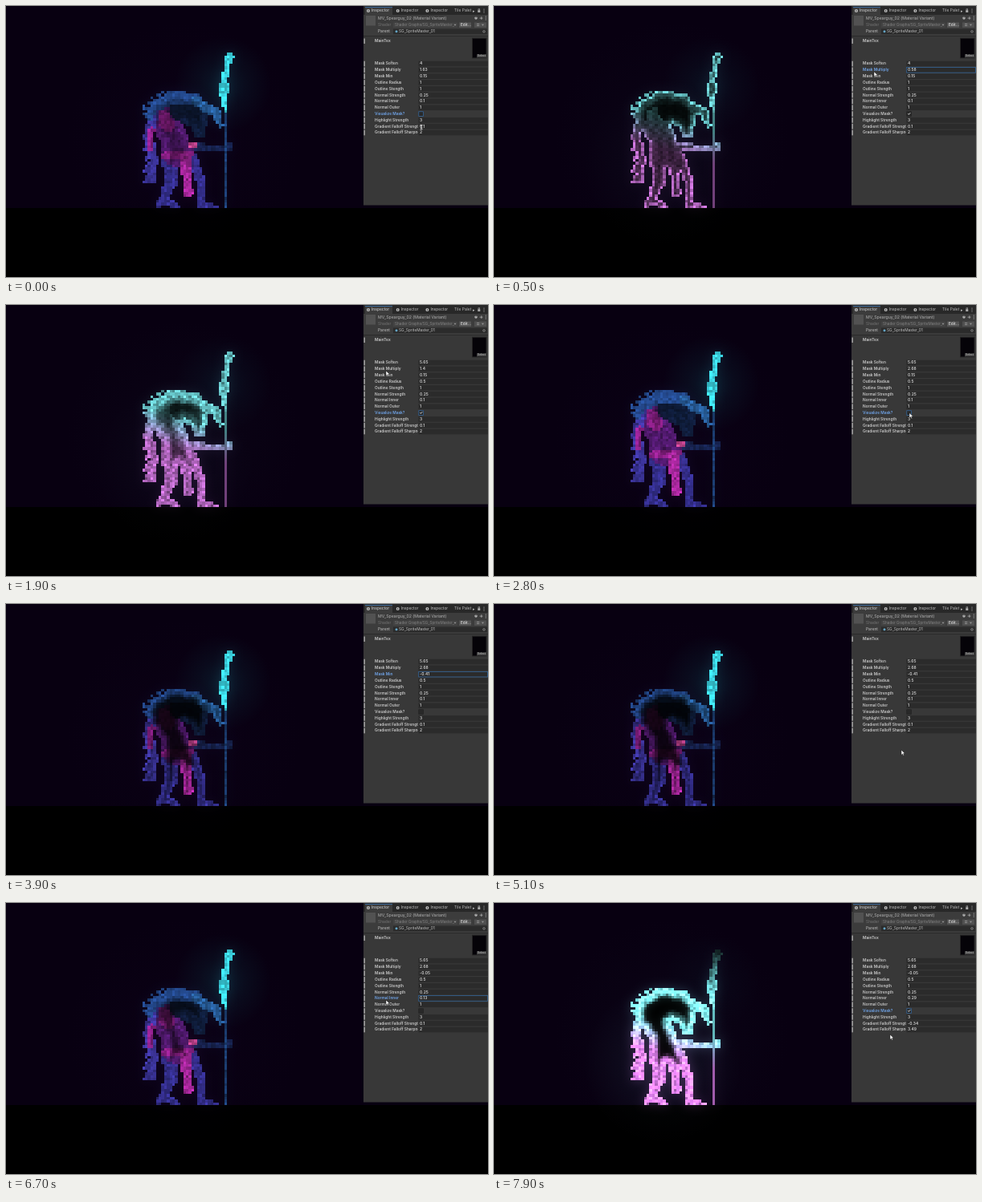
These frames come from a looping animation (600x338 px, 8 s). An HTML page with a canvas:

```html
<!DOCTYPE html>
<html lang="en">
<head>
<meta charset="utf-8">
<title>Sprite mask tuning</title>
<style>
html, body { margin: 0; width: 100%; height: 100%; overflow: hidden; background: #000; }
canvas { display: block; width: 600px; height: 338px; }
</style>
</head>
<body>
<canvas id="stage" width="600" height="338"></canvas>
<script>
const ctx = document.getElementById('stage').getContext('2d');
const LOOP = 8000, STEP = 100, FLOOR = 252;
const CELL = 3.4, LEFT = 169.6, COLS = 34, ROWS = 57, TOP = FLOOR - ROWS * CELL;
const clamp = (v, a = 0, b = 1) => Math.min(b, Math.max(a, v));
const mix = (a, b, t) => a + (b - a) * t;
const ease = t => t * t * (3 - 2 * t);
const random = n => { const v = Math.sin(n * 127.1) * 43758.5453; return v - Math.floor(v); };
const rowY = i => 72 + i * 7.82;

// Session: every drag, click and rest sets the pointer, the focus and the values
const TOGGLE_ROW = 8;
const initial = { soften: 4, multiply: 1.63, min: .15, radius: 1, inner: .1, falloff: .1, sharpness: 2 };
const drag = (row, key, at, until, to, hidden) => ({ row, key, at, until, to, hidden, x: 473, y: rowY(row) + 3 });
const click = at => ({ row: TOGGLE_ROW, at, until: at, toggle: true, x: 517, y: rowY(TOGGLE_ROW) + 1 });
const rest = (at, x, y, row) => ({ row, at, until: at, x, y });
const session = [
  rest(0, 517, 151, TOGGLE_ROW),
  click(100),
  drag(1, 'multiply', 300, 500, .58),
  drag(1, 'multiply', 500, 800, 1.4),
  drag(0, 'soften', 900, 1200, 5.65),
  drag(3, 'radius', 1300, 1500, .5),
  click(1600), click(1700),
  rest(1900, 473, 83, TOGGLE_ROW),
  drag(1, 'multiply', 2000, 2600, 2.68),
  click(2800),
  drag(2, 'min', 3100, 3900, -.41, true),
  rest(5100, 507, 183, -1),
  drag(2, 'min', 5400, 5900, -.05),
  drag(6, 'inner', 6200, 6700, .13),
  drag(6, 'inner', 6700, 7000, .29),
  drag(10, 'falloff', 7050, 7300, -.34),
  drag(11, 'sharpness', 7400, 7600, 3.49),
  click(7800),
  rest(7900, 493, 165, TOGGLE_ROW)
];

function stateAt(t) {
  const s = { ...initial, masked: false, focus: TOGGLE_ROW };
  let from = session[0];
  for (const a of session) {
    if (t < a.at) {
      const p = ease(clamp((t - from.until) / (a.at - from.until)));
      s.x = mix(from.x, a.x, p);
      s.y = mix(from.y, a.y, p);
      break;
    }
    s.focus = a.row;
    s.x = a.x;
    s.y = a.y;
    s.hidden = a.hidden;
    if (a.toggle) s.masked = !s.masked;
    if (a.key) {
      const change = (a.to - s[a.key]) * clamp((t - a.at) / (a.until - a.at));
      s[a.key] += change;
      s.x += change * 6;
    }
    from = { ...a, x: s.x };
  }
  s.fall = clamp((.1 - s.falloff) / .44);
  return s;
}

// Sprite: tapered limbs painted back to front on a coarse grid
const palette = {
  leg: [58, 52, 158], torso: [88, 28, 120], cape: [164, 36, 156], arm: [66, 58, 172],
  cloth: [190, 44, 176], mane: [40, 82, 158], head: [17, 32, 66], beak: [44, 104, 172],
  hand: [25, 38, 88], gem: [220, 76, 157], shaft: [32, 72, 132], blade: [58, 208, 222]
};
const grid = new Map();

function paint(name, covers) {
  for (let r = 0; r < ROWS; r++) for (let c = 0; c < COLS; c++) {
    const x = LEFT + (c + .5) * CELL, y = TOP + (r + .5) * CELL, id = r * 100 + c;
    if (!covers(x, y)) continue;
    if (name === 'gap') grid.delete(id);
    else grid.set(id, { c, r, x, y, name, grain: .75 + .4 * random(c + r * 2.45) });
  }
}
function limb(name, ...joints) {
  joints.slice(1).forEach(([bx, by, br], i) => {
    const [ax, ay, ar] = joints[i], dx = bx - ax, dy = by - ay;
    paint(name, (x, y) => {
      const t = clamp(((x - ax) * dx + (y - ay) * dy) / (dx * dx + dy * dy));
      return Math.hypot(x - ax - dx * t, y - ay - dy * t) < mix(ar, br, t);
    });
  });
}

limb('leg', [233, 190, 6], [243, 220, 6], [242, 248, 5], [262, 251, 3]);
limb('leg', [203, 195, 9], [206, 218, 8], [196, 240, 5], [211, 250, 5]);
limb('leg', [196, 240, 5], [189, 250, 4]);
limb('torso', [200, 142, 17], [214, 182, 19]);
limb('cape', [194, 137, 9], [202, 149, 8]);
limb('cape', [198, 187, 5], [230, 184, 5]);
limb('cloth', [223, 188, 6], [227, 233, 6]);
limb('gap', [190, 168, 2.5], [190, 204, 3]);
limb('arm', [184, 135, 6], [177, 163, 6], [185, 190, 4], [181, 217, 5]);
for (let y = 146; y < 216; y += 13) limb('arm', [180, y, 4], [172 + 3 * random(y), y + 8, 2]);
limb('cape', [181, 155, 4], [180, 178, 3]);
limb('head', [216, 128, 14], [238, 140, 14], [241, 158, 7]);
limb('mane', [186, 126, 5], [213, 113, 8], [240, 117, 6]);
for (let i = 0; i < 9; i++) {
  const a = Math.PI * (1.1 + i * .058), x = 216 + 40 * Math.cos(a), y = 150 + 40 * Math.sin(a);
  const reach = 7 + 6 * random(i + 3);
  limb('mane', [x + 3, y + 2, 4], [x - reach * .9, y - reach * .5, 1.5]);
}
limb('beak', [236, 119, 6], [262, 134, 6], [267, 149, 3]);
limb('hand', [236, 175, 5], [250, 176, 3.5], [270, 176, 3], [277, 175, 6]);
limb('gem', [232, 174, 4], [234, 174, 4]);
paint('shaft', (x, y) => Math.abs(x - 273.3) < 1.7 && y > 130);
paint('blade', (x, y) => {
  const u = (y - 57) / 77;
  if (u < 0 || u > 1) return false;
  const middle = mix(280, 273, u) - 5 * Math.sin(Math.PI * u);
  return Math.abs(x - middle) < 1.6 + 2.8 * Math.sin(Math.PI * u) + 3.5 * Math.max(0, Math.sin(u * 13));
});

for (const cell of grid.values()) {
  cell.depth = 9;
  for (let j = -8; j <= 8; j++) for (let i = -8; i <= 8; i++) {
    const c = cell.c + i, r = cell.r + j;
    if (c < 0 || c >= COLS || r < 0 || !grid.has(r * 100 + c))
      cell.depth = Math.min(cell.depth, Math.hypot(i, j));
  }
}

const sprite = document.createElement('canvas');
sprite.width = 600; sprite.height = 338;
const pen = sprite.getContext('2d');
const CYAN = [112, 214, 218], PINK = [192, 110, 206];

function shade({ x, y, depth, name, grain }, s) {
  const streak = .72 + .28 * Math.sin(x * .5 + 2 * Math.sin(y * .3)) * Math.sin(y * .37);
  let m = s.multiply * (Math.max(0, 1 - depth / s.soften) + s.min - (s.inner - .1));
  if (s.radius > .5 && depth < 1.1) m = Math.max(m, (s.radius - .5) * 2);
  m = clamp(m) * streak;
  if (!s.masked) {
    const ambient = .12 + .5 * clamp(s.min + .41);
    const light = name === 'blade' ? 1 : mix(ambient, 1, Math.pow(m, .8));
    return palette[name].map(k => k * light * grain);
  }
  const cloth = name === 'torso' || name === 'cape' || name === 'cloth';
  if (cloth) m = Math.max(m, .3 * streak * (1 - s.fall));
  if (name === 'shaft') m = .5;
  if (name === 'head' && depth > 2) m *= .45;
  if (name === 'blade') m *= mix(1, clamp((y - 50) / 75, .12, 1), s.fall);
  const t = clamp((y - 128 - (x - 175) * .3) / 40 - .25 * s.fall);
  return CYAN.map((k, i) => mix(k, PINK[i], t) * m * (1.15 + .45 * s.fall));
}

function glow(x, y, radius, rgb, alpha) {
  const g = ctx.createRadialGradient(x, y, 0, x, y, radius);
  g.addColorStop(0, `rgba(${rgb},${alpha})`);
  g.addColorStop(.5, `rgba(${rgb},${alpha * .4})`);
  g.addColorStop(1, `rgba(${rgb},0)`);
  ctx.fillStyle = g;
  ctx.fillRect(x - radius, y - radius, radius * 2, radius * 2);
}

function scene(s) {
  rect(0, 0, 600, 338, '#000');
  rect(0, 0, 600, FLOOR, '#080011');
  glow(222, 165, 145, s.masked ? '16,14,32' : '16,4,30', .4);
  glow(270, 98, 60, '16,100,112', s.masked ? .16 * (1 - s.fall * .6) : .25);
  if (s.masked) glow(210, 200, 98, '55,85,105', .08 + .17 * s.fall);
  rect(0, FLOOR, 445, 86, 'rgba(0,0,0,.65)');

  pen.clearRect(0, 0, 600, 338);
  for (const cell of grid.values()) {
    const x = Math.round(LEFT + cell.c * CELL), y = Math.round(TOP + cell.r * CELL);
    pen.fillStyle = `rgb(${shade(cell, s).map(k => Math.round(clamp(k, 0, 255)))})`;
    pen.fillRect(x, y, Math.round(LEFT + (cell.c + 1) * CELL) - x, Math.round(TOP + (cell.r + 1) * CELL) - y);
  }
  ctx.drawImage(sprite, 0, 0);
  ctx.save();
  ctx.globalCompositeOperation = 'lighter';
  ctx.globalAlpha = .13 + .1 * (s.masked ? s.fall : 0);
  ctx.filter = 'blur(7px)';
  ctx.drawImage(sprite, 0, 0);
  ctx.restore();
}

function rect(x, y, w, h, color) {
  ctx.fillStyle = color;
  ctx.fillRect(x, y, w, h);
}
function text(str, x, y, size = 4.9, color = '#c4c4c4', weight = 400) {
  ctx.font = `${weight} ${size}px Inter, sans-serif`;
  ctx.fillStyle = color;
  ctx.fillText(str, x, y);
}
function dot(x, y, r, color) {
  ctx.fillStyle = color;
  ctx.beginPath();
  ctx.arc(x, y, r, 0, 7);
  ctx.fill();
}
function caret(x, y) {
  ctx.fillStyle = '#999';
  ctx.beginPath();
  ctx.moveTo(x - 1.5, y - 1);
  ctx.lineTo(x + 1.5, y - 1);
  ctx.lineTo(x, y + 1);
  ctx.fill();
}
function frame(x, y, w, h, color) {
  ctx.strokeStyle = color;
  ctx.lineWidth = .7;
  ctx.strokeRect(x, y, w, h);
}

function header() {
  rect(445, 0, 155, 248.5, '#383838');
  rect(445, 0, 155, 11, '#282828');
  rect(447, 1, 34, 10, '#3c3c3c');
  rect(447, 1, 34, .8, '#3a72b0');
  for (let i = 0; i < 3; i++) {
    const x = 451 + i * 36.7;
    dot(x, 6, 2, '#c4c4c4');
    rect(x - .4, 4.8, .8, 2.5, '#333');
    text('Inspector', x + 4, 6, 4.9, '#c4c4c4', i ? 400 : 500);
  }
  text('Tile Palet', 558, 6, 4.9, '#b8b8b8');
  text('▸', 581, 6, 5, '#bbb');
  rect(587.3, 5.4, 3, 2.6, '#aaa');
  frame(588, 3.8, 1.7, 2, '#aaa');

  rect(445, 11, 155, 26, '#3c3c3c');
  rect(445, 37, 155, .8, '#282828');
  rect(448, 12, 12, 12.5, '#525252');
  text('MV_Spearguy_02 (Material Variant)', 463, 15, 5.2, '#b4b4b4');
  dot(585, 15, 1.7, '#bbb');
  text('?', 584.1, 15.1, 3.4, '#333', 700);
  rect(589.5, 14.8, 4, .6, '#bbb');
  rect(591.5, 13.3, .8, 3.6, '#bbb');
  for (const x of [595, 597.3])
    for (let i = -1; i < 2; i++) dot(x, (x < 597 ? 6 : 15) + i * 2, .6, '#bbb');
  text('Shader', 463, 23.6, 4.9, '#757575');
  rect(482, 20.5, 80, 6.4, '#434343');
  text('Shader Graphs/SG_SpriteMaster_', 484, 23.7, 4.7, '#828282');
  caret(559, 23.8);
  rect(564, 20.5, 15, 6.4, '#555');
  text('Edit...', 566, 23.7, 4.7, '#d0d0d0', 600);
  rect(583, 20.5, 15, 6.4, '#505050');
  rect(586, 22.2, 3.2, .6, '#bbb');
  rect(586, 24.2, 3.2, .6, '#bbb');
  caret(593.5, 23.8);
  text('Parent', 463, 31.8);
  rect(482, 28.6, 117, 6.5, '#2b2b2b');
  dot(486, 31.8, 1.5, '#64a4c4');
  text('SG_SpriteMaster_01', 489, 31.9, 4.8);
  dot(595, 31.8, 1.6, '#999');
  dot(595, 31.8, .9, '#2b2b2b');

  rect(445.5, 40.5, 1.3, 6.5, '#b4b4b4');
  text('MainTex', 459, 44, 4.9, '#cacaca', 600);
  rect(580, 39.8, 18.5, 25.5, '#222');
  rect(581, 40.8, 16.5, 23.5, '#050308');
  rect(586, 60.2, 12, 4.2, '#404040');
  text('Select', 587, 62.4, 3.3, '#bbb', 500);
}

function inspector(s) {
  ctx.textBaseline = 'middle';
  header();
  const rows = [['Mask Soften', s.soften], ['Mask Multiply', s.multiply], ['Mask Min', s.min],
    ['Outline Radius', s.radius], ['Outline Stength', 1], ['Normal Strength', .25],
    ['Normal Inner', s.inner], ['Normal Outer', 1], ['Visualize Mask?'], ['Highlight Strength', 3],
    ['Gradient Falloff Strength', s.falloff], ['Gradient Falloff Sharpness', s.sharpness]];
  rows.forEach(([label, value], i) => {
    const y = rowY(i), active = i === s.focus;
    rect(445.5, y - 3.3, 1.3, 6.6, '#b4b4b4');
    ctx.save();
    ctx.beginPath();
    ctx.rect(447, y - 4, 66, 8);
    ctx.clip();
    text(label, 459, y, 4.8, active ? '#70a4e8' : '#c8c8c8', 600);
    ctx.restore();
    if (value === undefined) {
      rect(513.8, y - 2.8, 5.6, 5.6, '#292929');
      frame(513.8, y - 2.8, 5.6, 5.6, active ? '#346ba6' : '#222');
      if (s.masked) text('✓', 514.5, y + .2, 5, '#ddd', 700);
    } else {
      rect(513.5, y - 3.3, 86.5, 6.6, '#2b2b2b');
      if (active) frame(513.7, y - 3.3, 85.8, 6.6, '#346ba6');
      text(String(Math.round(value * 100) / 100), 515, y, 4.9, '#d0d0d0', 600);
    }
  });
}

function cursor({ x, y, hidden }, editing) {
  if (hidden) return;
  if (editing) {
    rect(x - .4, y - 3, .9, 6, '#eee');
    for (const end of [-3, 2.4]) rect(x - 1.6, y + end, 3.2, .7, '#eee');
    return;
  }
  ctx.save();
  ctx.translate(x, y - 1);
  ctx.fillStyle = '#fff';
  ctx.strokeStyle = '#111';
  ctx.lineWidth = .5;
  ctx.beginPath();
  ctx.moveTo(0, 0);
  ctx.lineTo(0, 6.4);
  ctx.lineTo(1.5, 5);
  ctx.lineTo(2.6, 7.2);
  ctx.lineTo(3.6, 6.7);
  ctx.lineTo(2.6, 4.6);
  ctx.lineTo(4.6, 4.5);
  ctx.closePath();
  ctx.fill();
  ctx.stroke();
  ctx.restore();
}

function draw(t) {
  const s = stateAt(t);
  scene(s);
  inspector(s);
  cursor(s, t < STEP);
}

let shown = -1;
function tick(now) {
  const t = Math.floor(now % LOOP / STEP) * STEP;
  if (t !== shown) draw(shown = t);
  requestAnimationFrame(tick);
}
draw(0);
requestAnimationFrame(tick);
</script>
</body>
</html>
```
